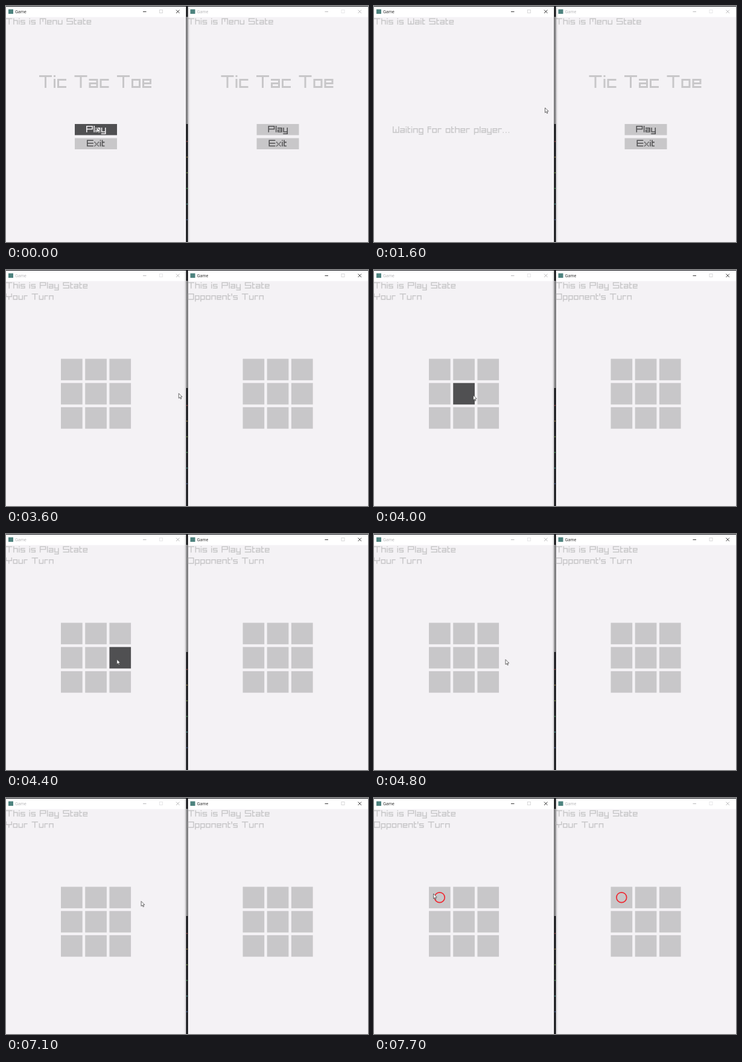
These frames come from a looping animation (600 px wide and 392 px high, 8 s). An HTML page with a canvas:

```html
<!DOCTYPE html>
<html lang="en">
<head>
<meta charset="utf-8">
<title>Tic Tac Toe</title>
<style>
  html, body { margin: 0; width: 100%; height: 100%; overflow: hidden; }
  canvas { display: block; width: 600px; height: 392px; }
</style>
</head>
<body>
<canvas id="stage" width="600" height="392"></canvas>
<script>
const g = document.getElementById('stage').getContext('2d');
const LOOP = 8000, STEP = 100, WIDTH = 298.5, RIGHT = 301.5;
const PAPER = '#f4f2f5', LIGHT = '#c8c7c9', DARK = '#505052';
const JOIN = 2100, PLAY = 2200, MOVE = 7600;

// Square lettering: each glyph is a set of named segments.
// a-g as on a seven-segment display, j k centre stems, A ascender,
// H high bar, D R left and right descenders, U low bar, x diagonals.
const GLYPHS = {
  T: 'ajk', M: 'abcefj', S: 'afgcd', P: 'abgfe', W: 'bcdefk', O: 'abcdef',
  Y: 'fgbk', E: 'adefg', a: 'abcdeg', c: 'adef', e: 'abdefg', f: 'HAaef',
  g: 'abcdefRU', h: 'Aabcef', i: 'Hef', l: 'Aef', n: 'abcef', o: 'abcdef',
  p: 'abcdefD', r: 'aef', s: 'afgcd', t: 'Aaefd', u: 'bcdef', x: 'x',
  y: 'bcdefRU', "'": 'A', '.': 'd'
};

function span(ch) {
  if (/[A-Z]/.test(ch)) return 6;
  if ("il'.".includes(ch)) return 0;
  return ch === 't' ? 2 : 'fr'.includes(ch) ? 3 : 4;
}

function segments(w, top) {
  const mid = (top + 6) / 2, base = 6, low = 8, c = w / 2;
  return {
    a: [0, top, w, top], g: [0, mid, w, mid], d: [0, base, w, base],
    f: [0, top, 0, mid], b: [w, top, w, mid], j: [c, top, c, mid],
    e: [0, mid, 0, base], c: [w, mid, w, base], k: [c, mid, c, base],
    A: [0, 0, 0, top], H: [0, 0, w, 0],
    D: [0, base, 0, low], R: [w, base, w, low], U: [0, low, w, low]
  };
}

function lettering(text, x, y, unit, color) {
  const block = (x0, y0, x1, y1) => g.rect(x + x0 * unit, y + y0 * unit,
    (x1 - x0 + 1) * unit, (y1 - y0 + 1) * unit);
  g.fillStyle = color;
  g.beginPath();
  for (const ch of text) {
    if (ch === ' ') { x += 3.5 * unit; continue; }
    const w = span(ch), top = w === 6 ? 0 : 2, parts = segments(w, top);
    for (const name of GLYPHS[ch]) {
      if (name !== 'x') { block(...parts[name]); continue; }
      for (let i = 0; i <= w; i++) {
        block(i, top + i, i, top + i);
        block(w - i, top + i, w - i, top + i);
      }
    }
    x += (w + (ch === '.' ? 3 : 2)) * unit;
  }
  g.fill();
}

function box(x, y, w, h, color) {
  g.fillStyle = color;
  g.fillRect(x, y, w, h);
}

function line(color, x0, y0, x1, y1) {
  g.strokeStyle = color;
  g.lineWidth = 0.9;
  g.beginPath();
  g.moveTo(x0, y0);
  g.lineTo(x1, y1);
  g.stroke();
}

// Pointer moves: start, end, then where it comes to rest
const HOME = [150.5, 202];
const MOVES = [
  [1500, 1600, 283.5, 169], [1600, 2100, 438.5, 201], [3400, 4000, 164.5, 208],
  [4300, 4800, 218, 208.5], [4800, 5200, 369, 185], [5400, 6200, 435, 144.5],
  [6200, 6600, 420, 191], [6800, 7600, 98.5, 159]
];

function pointerAt(t) {
  let [x, y] = HOME;
  for (const [start, end, toX, toY] of MOVES) {
    const k = Math.min(1, Math.max(0, (t - start) / (end - start)));
    const eased = k * (2 - k);
    x += (toX - x) * eased;
    y += (toY - y) * eased;
  }
  return [x, y];
}

function titleBar(active) {
  const ink = active ? '#222' : '#b2b2b4';
  box(0, 1, WIDTH, 17.5, '#fff');
  box(4, 5.5, 8, 7.5, '#4d827e');
  g.fillStyle = ink;
  g.font = '6.8px "Open Sans", "Noto Sans", sans-serif';
  g.fillText('Game', 15, 12);
  line(ink, 227, 9.5, 232.5, 9.5);
  line(ink, 282, 6.5, 287.5, 12);
  line(ink, 287.5, 6.5, 282, 12);
  g.strokeStyle = active ? '#d4d4d6' : '#e4e4e6';
  g.strokeRect(254.5, 6.5, 5, 5);
}

function menu(mx, my, pressed) {
  lettering('Tic Tac Toe', 55, 115, 3, LIGHT);
  ['Play', 'Exit'].forEach((label, i) => {
    const y = 196 + i * 23.5;
    const over = mx >= 114 && mx < 184 && my >= y && my < y + 18.5;
    box(114, y, 70, 18.5, over ? (pressed ? '#828284' : DARK) : LIGHT);
    lettering(label, 133 + i, y + 3, 1.55, over ? PAPER : DARK);
  });
}

function board(mx, my, canMove, marked) {
  const size = 35.7, pitch = 40.2;
  for (let i = 0; i < 9; i++) {
    const x = 91 + i % 3 * pitch, y = 147.5 + Math.floor(i / 3) * pitch;
    const over = canMove && mx >= x && mx < x + size && my >= y && my < y + size;
    box(x, y, size, size, over ? DARK : LIGHT);
  }
  if (!marked) return;
  g.strokeStyle = '#ef2730';
  g.lineWidth = 1.7;
  g.beginPath();
  g.arc(108.8, 165.2, 8.4, 0, Math.PI * 2);
  g.stroke();
}

function gameWindow(left, active, t, [px, py]) {
  const offset = left ? 0 : RIGHT, mx = px - offset;
  const state = t >= PLAY ? 'Play' : left && t >= 1000 ? 'Wait' : 'Menu';
  const marked = t >= MOVE, myTurn = left !== marked;
  g.save();
  g.translate(offset, 0);
  box(0, 18, WIDTH, 374, PAPER);
  titleBar(active);
  lettering(`This is ${state} State`, 0, 20.3, 1.51, LIGHT);
  if (state === 'Menu') {
    menu(mx, py, t === (left ? 700 : JOIN));
  } else if (state === 'Wait') {
    lettering('Waiting for other player...', 31, 200, 1.54, LIGHT);
  } else {
    lettering(myTurn ? 'Your Turn' : "Opponent's Turn", -0.5, 39, 1.51, LIGHT);
    board(mx, py, left && myTurn, marked);
  }
  g.restore();
}

function desktop() {
  box(0, 0, 600, 392, '#15161b');
  box(WIDTH, 18, RIGHT - WIDTH, 178, '#c4c4c6');
  for (let i = 0; i < 6; i++) box(299, 224 + i * 26, 2, 2, `hsl(${i * 44} 40% 40%)`);
}

// Soft shade beside the edge of the window in front
function shadow(leftActive) {
  const edge = leftActive ? WIDTH : RIGHT, reach = leftActive ? 7 : -7;
  const shade = g.createLinearGradient(edge, 0, edge + reach, 0);
  shade.addColorStop(0, '#0008');
  shade.addColorStop(0.4, '#0002');
  shade.addColorStop(1, '#0000');
  box(edge, 1, reach, 391, shade);
}

function pointer([x, y]) {
  g.beginPath();
  [[0, 0], [0, 8.2], [1.9, 6.5], [3.2, 9.4], [4.5, 8.8], [3.2, 6], [5.7, 5.8]]
    .forEach(([dx, dy]) => g.lineTo(x + dx, y + dy));
  g.closePath();
  g.fillStyle = '#fff';
  g.fill();
  g.strokeStyle = '#444';
  g.lineWidth = 0.8;
  g.stroke();
}

function draw(now) {
  const t = Math.floor(now % LOOP / STEP) * STEP;
  const at = pointerAt(t), leftActive = t < JOIN || t >= MOVE;
  desktop();
  gameWindow(true, leftActive, t, at);
  gameWindow(false, !leftActive, t, at);
  shadow(leftActive);
  pointer(at);
  requestAnimationFrame(draw);
}
requestAnimationFrame(draw);
</script>
</body>
</html>
```
